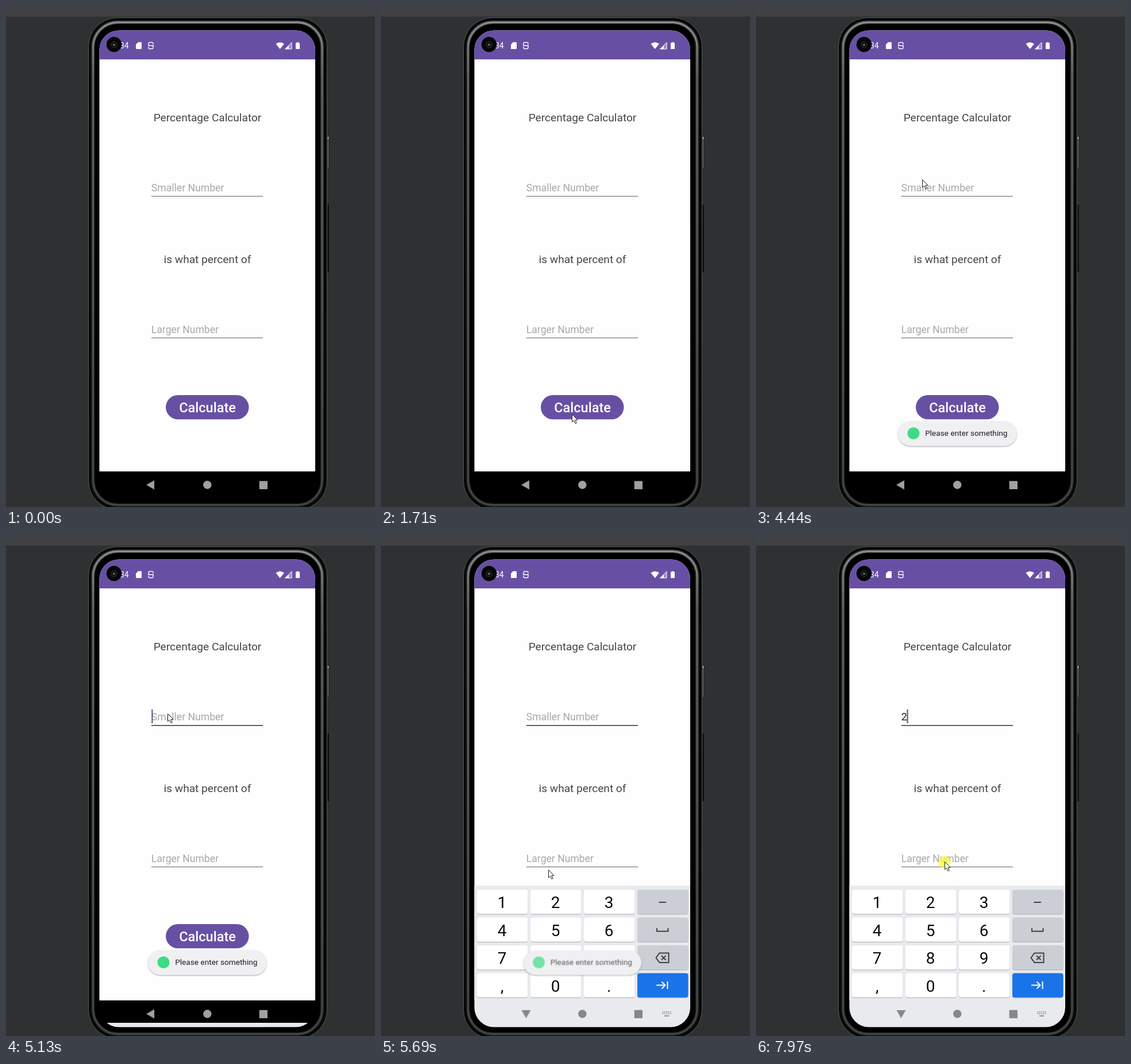
An HTML page for the animation above (8 s loop, 642 px wide and 873 px high).

```html
<!DOCTYPE html>
<html lang="en">
<head>
<meta charset="utf-8">
<title>Percentage Calculator</title>
<style>
html, body { margin: 0; width: 100%; height: 100%; overflow: hidden; background: #2f3032; }
svg { display: block; width: 642px; height: 873px; font-family: Roboto, "Noto Sans", sans-serif; }
.label { font-size: 19.1px; fill: #444549; text-anchor: middle; }
.field { font-size: 17.6px; fill: #a8a7aa; }
.typed { fill: #1d1b20; }
.digit { font-size: 28px; text-anchor: middle; fill: #0a0a0a; }
.icon { fill: none; stroke: #3c4043; stroke-width: 2; }

/* one shared 8 s clock; percentages are ms / 80 */
.anim { animation: 8s linear infinite; }
.hard { animation-timing-function: step-end; }

#cursor { animation-name: move; }
@keyframes move {
  0%      { transform: translate(620px, 856px); visibility: hidden; }
  4.62%   { transform: translate(620px, 856px); visibility: hidden; }
  4.625%  { transform: translate(620px, 856px); visibility: visible; animation-timing-function: ease-out; }
  14.375% { transform: translate(339px, 434px); }
  15.25%  { transform: translate(340px, 420px); animation-timing-function: ease-in-out; }
  18%     { transform: translate(340px, 326px); animation-timing-function: ease-in-out; }
  21.375% { transform: translate(332px, 711px); }
  22.25%  { transform: translate(332px, 711px); animation-timing-function: ease-in-out; }
  24.75%  { transform: translate(337px, 690px); animation-timing-function: ease-in-out; }
  27%     { transform: translate(352px, 637px); animation-timing-function: ease-in-out; }
  29.875% { transform: translate(369px, 699px); }
  37.375% { transform: translate(369px, 699px); }
  38.25%  { transform: translate(374px, 705px); }
  49.25%  { transform: translate(374px, 705px); animation-timing-function: ease-in-out; }
  55.5%   { transform: translate(289px, 302px); }
  58.25%  { transform: translate(289px, 302px); }
  59.75%  { transform: translate(281px, 311px); }
  68.5%   { transform: translate(281px, 311px); animation-timing-function: ease-in-out; }
  71.125% { transform: translate(291px, 583px); }
  72%     { transform: translate(291px, 583px); animation-timing-function: ease-out; }
  77.125% { transform: translate(304px, 645px); }
  81.5%   { transform: translate(304px, 645px); animation-timing-function: ease-in-out; }
  84%     { transform: translate(312px, 697px); animation-timing-function: ease-in-out; }
  88.5%   { transform: translate(350px, 577px); }
  91%     { transform: translate(350px, 577px); animation-timing-function: ease-out; }
  98%, 100% { transform: translate(328px, 569px); visibility: visible; }
}

#halo { animation-name: click; }
@keyframes click {
  0% { opacity: 0; } 37.375% { opacity: .65; } 39.2% { opacity: 0; }
  59.75% { opacity: .65; } 61.5% { opacity: 0; }
  79.875% { opacity: .65; } 81.5% { opacity: 0; }
  99.6%, 100% { opacity: .65; }
}

#ripple { animation-name: ripple; }
@keyframes ripple {
  0%, 37.375% { opacity: 0; }
  39% { opacity: 1; }
  40.75% { opacity: .9; }
  44.2%, 100% { opacity: 0; }
}

#toast { animation-name: toast; transform-origin: 350px 745px; }
@keyframes toast {
  0%, 39.8% { opacity: 0; transform: scale(.97); }
  40.7% { opacity: 1; transform: scale(.98); }
  42.5%, 70.2% { opacity: 1; transform: none; }
  71.125% { opacity: 1; transform: scale(.993); }
  72.8% { opacity: 1; transform: scale(.97); }
  72.9%, 100% { opacity: 0; transform: scale(.97); }
}
#message { animation-name: message; }
@keyframes message {
  0%, 39.8% { opacity: 0; }
  40.75% { opacity: .22; }
  42.5%, 70.2% { opacity: 1; }
  71.125% { opacity: .7; }
  72.8%, 100% { opacity: 0; }
}

#keyboard { animation-name: rise; }
@keyframes rise {
  0%, 64.1% { transform: translateY(247px); animation-timing-function: ease-out; }
  65.875% { transform: translateY(27px); animation-timing-function: ease-out; }
  67.7%, 100% { transform: none; }
}
#back { animation-name: turn; }
@keyframes turn {
  0%, 64.4% { transform: translate(252px, 834.5px) rotate(0deg); }
  65.875% { transform: translate(252px, 834.5px) rotate(-22deg); }
  68.5%, 100% { transform: translate(252.5px, 834px) rotate(-90deg); }
}
#nav { animation-name: tint; }
@keyframes tint { 0%, 64.1% { fill: #a0a0a0; } 66%, 100% { fill: #85878a; } }
#switcher { animation-name: appear; }
@keyframes appear { 0%, 64.5% { opacity: 0; } 65.875% { opacity: .5; } 67.5%, 100% { opacity: 1; } }

#focus { animation-name: focus; }
@keyframes focus { 0% { opacity: 0; } 60.6%, 100% { opacity: 1; } }
#hint { animation-name: hint; }
@keyframes hint { 0% { opacity: 1; } 81.5%, 100% { opacity: 0; } }
#value { animation-name: value; }
@keyframes value { 0% { opacity: 0; } 81.5%, 100% { opacity: 1; } }
#caret { animation-name: blink; }
@keyframes blink {
  0% { opacity: 0; transform: none; }
  61.5% { opacity: 1; } 67.75% { opacity: 0; }
  74% { opacity: 1; } 80.25% { opacity: 0; transform: none; }
  81.5% { opacity: 1; transform: translateX(9.5px); }
  87.9% { opacity: 0; transform: translateX(9.5px); }
  94.1%, 100% { opacity: 1; transform: translateX(9.5px); }
}
#press { animation-name: press; }
@keyframes press { 0% { opacity: 0; } 79.875% { opacity: .1; } 82.2%, 100% { opacity: 0; } }
</style>
</head>
<body>
<svg viewBox="0 0 642 873">
  <defs>
    <linearGradient id="metal" x1="0" y1="0" x2="0" y2="1">
      <stop offset="0" stop-color="#8c8f8d"/>
      <stop offset=".12" stop-color="#626564"/>
      <stop offset="1" stop-color="#434645"/>
    </linearGradient>
    <radialGradient id="glow" gradientUnits="userSpaceOnUse" cx="372" cy="703" r="100">
      <stop offset="0" stop-color="#fff" stop-opacity=".18"/>
      <stop offset="1" stop-color="#fff" stop-opacity=".09"/>
    </radialGradient>
    <clipPath id="screen"><rect x="162.5" y="42.500" width="375.500" height="815" rx="34"/></clipPath>
    <filter id="shadow" x="-10%" y="-20%" width="120%" height="150%">
      <feDropShadow dx="0" dy="1.2" stdDeviation="1.3" flood-color="#000" flood-opacity=".38"/>
    </filter>
  </defs>

  <rect width="642" height="873" fill="#2f3032"/>
  <rect width="642" height="18.5" fill="#404144"/>

  <!-- phone body -->
  <path d="M560.5 228v54" stroke="#6b6d6d"/>
  <path d="M560.5 228v4" stroke="#fff"/>
  <path d="M560.5 346v118" stroke="#050505" stroke-width="2"/>
  <rect x="143.5" y="20.5" width="415" height="857" rx="50" fill="#060707" stroke="#575a59"/>
  <g fill="none" stroke="url(#metal)">
    <rect x="151.5" y="28.500" width="398.500" height="841" rx="43" stroke-width="6" stroke-opacity=".45"/>
    <rect x="151.5" y="28.500" width="398.500" height="841" rx="43" stroke-width="2.800"/>
  </g>
  <rect x="154.5" y="31.500" width="392.500" height="835" rx="40" fill="#000"/>

  <g clip-path="url(#screen)">
    <rect x="162" y="42" width="377" height="769" fill="#fefefe"/>
    <rect x="162" y="42" width="377" height="51" fill="#6750a4"/>

    <!-- status bar -->
    <g fill="#fff">
      <text x="213.7" y="74" font-size="14" text-anchor="end">34</text>
      <path d="M230 63h5q1 0 1 1v10q0 1-1 1h-8q-1 0-1-1v-7z"/>
      <path d="M256 67v-1.500q0-2-2-2h-4q-2 0-2 2v1.500q0 2 2 2h4q2 0 2 2v1.500q0 2-2 2h-4q-2 0-2-2v-1.500M247 69h10" fill="none" stroke="#fff" stroke-width="1.300"/>
      <path d="M469.500 66q7-5.500 14.500 0l-7.300 9z"/>
      <path d="M497 63.500v11.500h-11.500z" fill-opacity=".35"/>
      <path d="M497 63.500v11.500h-11.500z" fill="none" stroke="#fff"/>
      <path d="M486 75l6-6v6z"/>
      <path d="M506 63h3v1.200h2v10.800h-7v-10.800h2z"/>
    </g>

    <!-- form -->
    <text class="label" x="350.500" y="201">Percentage Calculator</text>
    <text class="label" x="350.500" y="447.500">is what percent of</text>
    <text id="hint" class="field anim hard" x="252.800" y="323">Smaller Number</text>
    <text id="value" class="field typed anim hard" x="252.800" y="323">2</text>
    <text class="field" x="252.800" y="570">Larger Number</text>
    <path d="M253 331.500h194" stroke="#626064" stroke-width="1.200"/>
    <path d="M253 578.300h194" stroke="#7b797d" stroke-width="1.200"/>
    <path id="focus" class="anim hard" d="M253 331.900h194" stroke="#4d4670" stroke-width="1.800"/>
    <path id="caret" class="anim hard" d="M254.300 304v24" stroke="#4d4670" stroke-width="1.800"/>

    <rect x="278" y="678" width="144.500" height="42.300" rx="21.100" fill="#6750a4"/>
    <rect id="ripple" class="anim" x="278" y="678" width="144.500" height="42.300" rx="21.100" fill="url(#glow)"/>
    <text x="350.500" y="708.300" font-size="23.500" font-weight="500" text-anchor="middle" fill="#fff">Calculate</text>

    <!-- number pad -->
    <g id="keyboard" class="anim">
      <rect x="162" y="611" width="377" height="250" fill="#e8eaed"/>
      <g id="keys"></g>
      <rect id="press" class="anim hard" x="260" y="618" width="88.500" height="42.300" rx="4"/>
      <path class="icon" d="M483.500 640h12.500"/>
      <path class="icon" d="M480 685v5.500h19.500v-5.500"/>
      <path class="icon" d="M484.500 728.500h16v16.500h-16l-6-8.250zM488 733l7.500 7.500m0-7.500l-7.500 7.500" stroke-width="1.800"/>
      <path class="icon" d="M479 784.500h15m-5.500-6l6 6l-6 6M498.500 778v13" style="stroke:#fff"/>
    </g>

    <g id="nav" class="anim">
      <path id="back" class="anim" d="M-8 0L6-8V8z"/>
      <circle cx="350.300" cy="834.500" r="7.200"/>
      <rect x="440.700" y="827.700" width="14.300" height="14.300" rx=".8"/>
      <g id="switcher" class="anim" fill="none" stroke="#77797c" stroke-width="1.600">
        <path d="M489.500 831h15M489.500 834h15" stroke-dasharray="1.800 1.500"/>
        <path d="M493 838h8"/>
      </g>
    </g>
  </g>

  <!-- front camera -->
  <circle cx="188" cy="67" r="13.200" fill="#050506"/>
  <circle cx="188" cy="67.500" r="5.500" fill="#141517" stroke="#292b2e"/>
  <circle cx="188" cy="67.500" r="1.500" fill="#85888c"/>

  <g id="toast" class="anim">
    <rect x="247" y="723.500" width="206.500" height="43" rx="21.500" fill="#f0f0f2" filter="url(#shadow)"/>
    <g id="message" class="anim">
      <circle cx="274" cy="744.700" r="10.500" fill="#3ddc84"/>
      <text x="294.200" y="749.400" font-size="13.650" fill="#1c1b1f">Please enter something</text>
    </g>
  </g>

  <g id="cursor" class="anim">
    <circle id="halo" class="anim hard" cy="1" r="10.500" fill="#ffff1e"/>
    <path d="M.5.5V14L3.600 11.200 6 16.500 8.200 15.500 5.900 10.400H10z" fill="#fff" stroke="#1c1c22" stroke-linejoin="round"/>
  </g>
</svg>
<script>
const keys = document.getElementById("keys");

function add(tag, attrs, text = "") {
  const el = document.createElementNS("http://www.w3.org/2000/svg", tag);
  for (const name in attrs) el.setAttribute(name, attrs[name]);
  el.textContent = text;
  keys.append(el);
}

["123", "456", "789", ",0."].forEach((row, r) => {
  const y = 618 + r * 48.5;
  for (let c = 0; c < 4; c++) {
    const x = 167 + c * 93;
    const fill = c < 3 ? "#fff" : r < 3 ? "#cbced4" : "#1a73e8";
    const box = { x, width: 88.5, height: 42.3, rx: 4 };
    add("rect", { ...box, y: y + 1.2, fill: "#b4b7bc" });
    add("rect", { ...box, y, fill });
    if (c < 3) add("text", { class: "digit", x: x + 43.7, y: y + 32 }, row[c]);
  }
});
</script>
</body>
</html>
```
